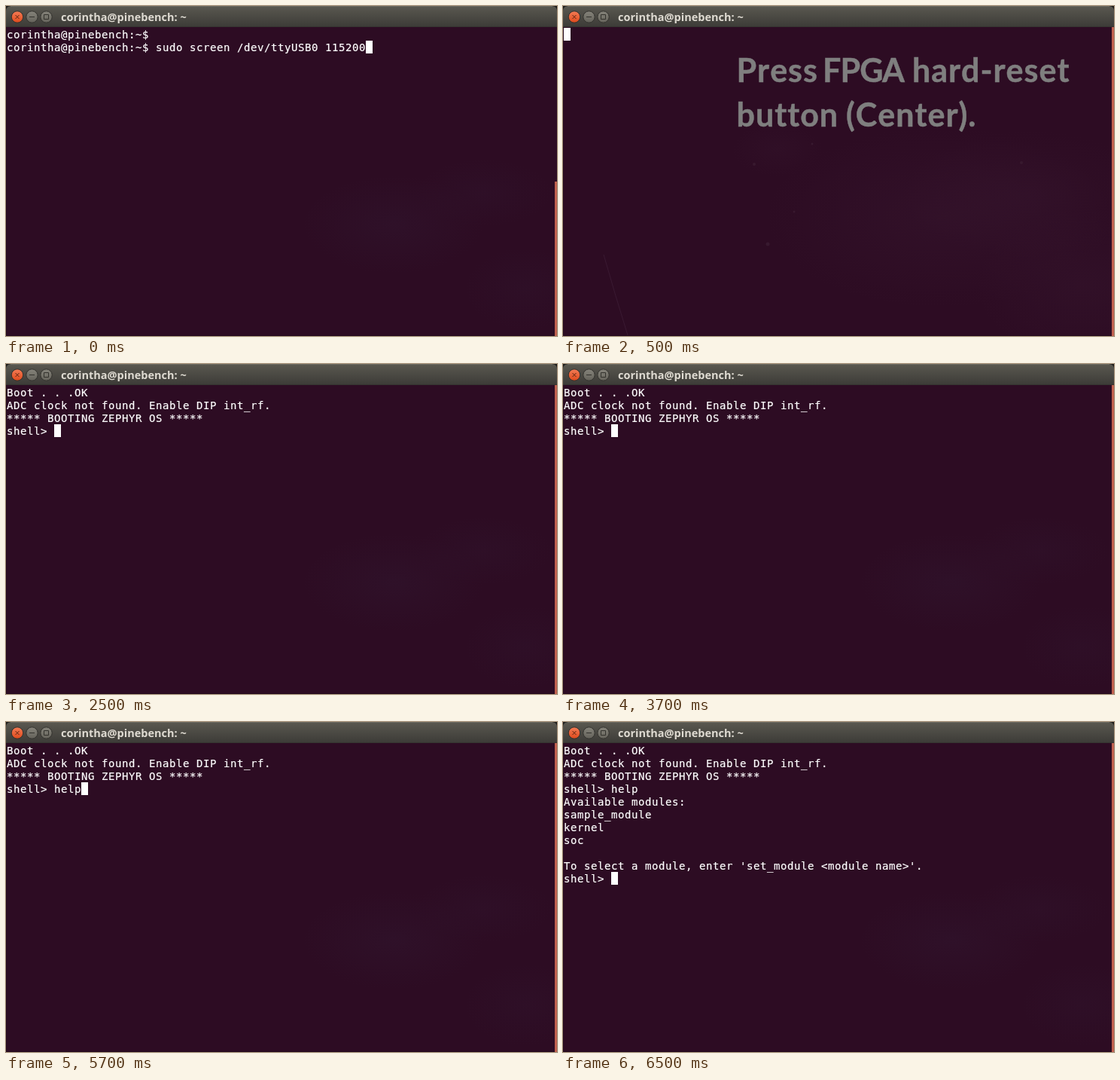
Write an HTML page that moves like this. It is 732 px wide and 438 px high and loops after 8 s.

```html
<!DOCTYPE html>
<html lang="en">
<head>
<meta charset="utf-8">
<title>Serial shell</title>
<style>
  html, body { margin: 0; width: 100%; height: 100%; overflow: hidden; background: #2d0c23; }
  .stage { position: relative; width: 732px; height: 438px; overflow: hidden; background: #2d0c23; }
  .stage > svg, .strip { position: absolute; left: 0; top: 0; }

  /* Five screens stacked; the strip jumps from one to the next. */
  .strip { width: 732px; animation: cut 8s step-end infinite; }
  @keyframes cut {
    0%     { transform: translateY(0); }
    6.25%  { transform: translateY(-438px); }
    31.25% { transform: translateY(-876px); }
    56.25% { transform: translateY(-1314px); }
    81.25% { transform: translateY(-1752px); }
  }

  .screen {
    position: relative; height: 438px; overflow: hidden;
    background:
      radial-gradient(90px 45px at 635px 248px, #3a2a481c, #3a2a4800),
      radial-gradient(120px 65px at 515px 290px, #3a2a4828, #3a2a4800),
      radial-gradient(80px 55px at 690px 375px, #3a2a481c, #3a2a4800),
      #2d0c23;
  }
  .screen.bright {
    background:
      radial-gradient(170px 85px at 620px 250px, #4b2b461c, #4b2b4600),
      radial-gradient(230px 120px at 500px 280px, #4b2b4626, #4b2b4600),
      radial-gradient(140px 100px at 690px 370px, #4b2b4624, #4b2b4600),
      radial-gradient(60px 36px at 285px 190px, #4b2b4618, #4b2b4600),
      #2d0c23;
  }
  .bar { position: absolute; right: 0; top: 28px; bottom: 0; width: 3px; background: #c0614f; }
  .bar.low { top: 233px; }

  pre {
    position: absolute; left: 1px; top: 30px; margin: 0; color: #fff;
    font: 14px/17px "DejaVu Sans Mono", monospace;
    letter-spacing: .571px; font-variant-ligatures: none;
    -webkit-text-stroke: .2px #fff;
  }
  pre i {
    position: relative; top: -1px; display: inline-block;
    width: 9px; height: 17px; vertical-align: top; background: #fff;
  }

  .title { font: 700 14.5px "Open Sans", "Noto Sans", sans-serif; fill: #dfdbd2; }
  .note {
    font: 700 43px Lato, sans-serif; font-kerning: none; letter-spacing: 1px;
    fill: #7f7f7f; stroke: #7f7f7f; stroke-width: .5;
  }
  .note .caps { font-kerning: normal; letter-spacing: -.9px; }
  .screen svg { position: absolute; left: 0; top: 0; }
</style>
</head>
<body>
<div class="stage">
  <div class="strip">
    <div class="screen">
      <pre>corintha@pinebench:~$
corintha@pinebench:~$ sudo screen /dev/ttyUSB0 115200<i></i></pre>
      <div class="bar low"></div>
    </div>

    <div class="screen bright">
      <svg width="732" height="438">
        <path d="M54 330Q70 386 86 437" fill="none" stroke="#3a1a32"/>
        <g fill="#38192f">
          <circle cx="272" cy="316" r="2.5"/>
          <circle cx="254" cy="210" r="2"/>
          <circle cx="307" cy="273" r="1.5"/>
          <circle cx="609" cy="208" r="2"/>
          <circle cx="331" cy="183" r="1.5"/>
        </g>
        <g class="note">
          <text y="101"><tspan x="230.5">Press </tspan><tspan class="caps" x="345">FPGA </tspan><tspan x="464">hard-reset</tspan></text>
          <text y="160"><tspan x="230.5">button </tspan><tspan x="376">(Center).</tspan></text>
        </g>
      </svg>
      <pre><i></i></pre>
      <div class="bar"></div>
    </div>

    <div class="screen">
      <pre>Boot . . .OK
ADC clock not found. Enable DIP int_rf.
***** BOOTING ZEPHYR OS *****
shell&gt; <i></i></pre>
      <div class="bar"></div>
    </div>

    <div class="screen">
      <pre>Boot . . .OK
ADC clock not found. Enable DIP int_rf.
***** BOOTING ZEPHYR OS *****
shell&gt; help<i></i></pre>
      <div class="bar"></div>
    </div>

    <div class="screen">
      <pre>Boot . . .OK
ADC clock not found. Enable DIP int_rf.
***** BOOTING ZEPHYR OS *****
shell&gt; help
Available modules:
sample_module
kernel
soc

To select a module, enter 'set_module &lt;module name&gt;'.
shell&gt; <i></i></pre>
      <div class="bar"></div>
    </div>
  </div>

  <!-- Window frame -->
  <svg width="732" height="438">
    <defs>
      <linearGradient id="head" x2="0" y2="1">
        <stop stop-color="#5a5850"/>
        <stop offset="1" stop-color="#3c3b37"/>
      </linearGradient>
      <linearGradient id="close" x2="0" y2="1">
        <stop stop-color="#f37c56"/>
        <stop offset="1" stop-color="#df4a1c"/>
      </linearGradient>
      <linearGradient id="knob" x2="0" y2="1">
        <stop stop-color="#85837a"/>
        <stop offset="1" stop-color="#64625a"/>
      </linearGradient>
    </defs>
    <path d="M0 0H732V28H0z" fill="#1c1b19"/>
    <path d="M0 28V7Q0 0 7 0H725Q732 0 732 7V28z" fill="url(#head)"/>
    <path d="M6 .5H726" stroke="#6b6960"/>
    <path d="M0 27.5H732" stroke="#353430"/>
    <path d="M.5 28V437.5H729" fill="none" stroke="#240a1c"/>
    <g stroke="#31302c">
      <circle cx="15" cy="14.5" r="7.7" fill="url(#close)"/>
      <circle cx="34.5" cy="14.5" r="7.7" fill="url(#knob)"/>
      <circle cx="53.5" cy="14.5" r="7.7" fill="url(#knob)"/>
    </g>
    <g fill="none" stroke="#33322d">
      <path d="M12.5 12l5 5m0-5l-5 5" stroke="#5a2412"/>
      <path d="M31 14.5h7"/>
      <path d="M50.5 11.5h6v6h-6z"/>
    </g>
    <text class="title" x="73" y="20">corintha@pinebench: ~</text>
  </svg>
</div>
</body>
</html>
```
